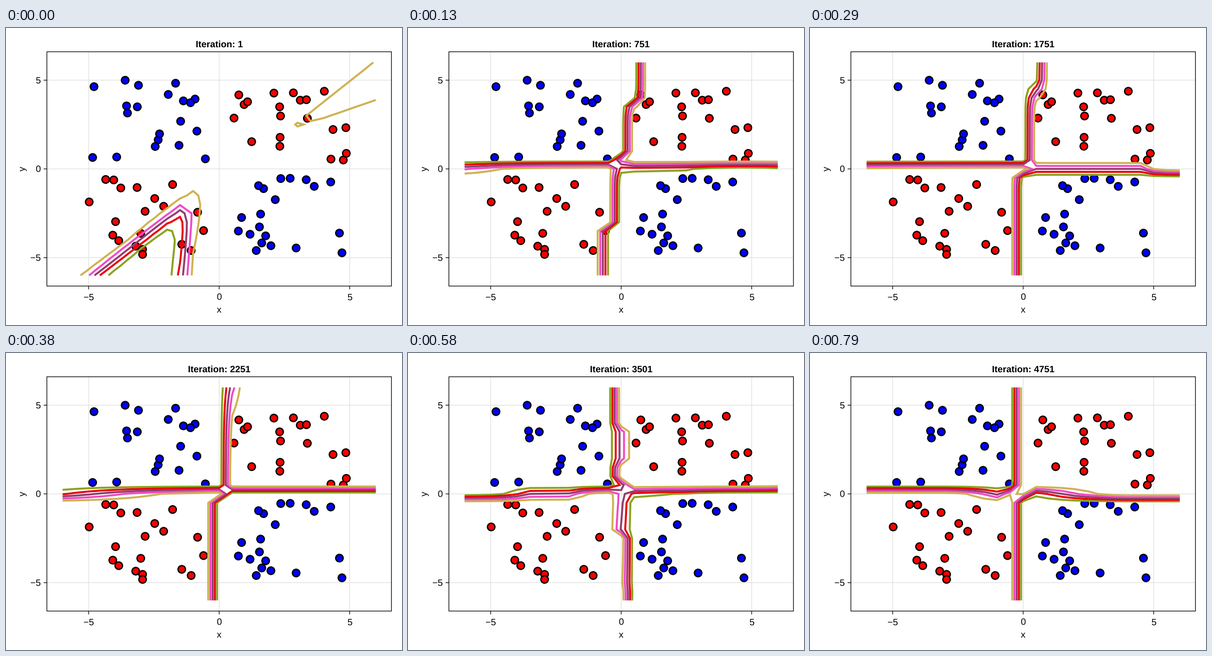
These frames come from a looping animation (864 by 648 pixels, 830 ms). A matplotlib script:

```python
import matplotlib.pyplot as plt
import numpy as np
from matplotlib.animation import FuncAnimation
from matplotlib.collections import PatchCollection
from matplotlib.patches import Circle, Rectangle

W, H = 864, 648
U = 1.44                                   # pixels per layout unit
LEFT, RIGHT, TOP, BOTTOM = 62 * U, 584 * U, 36 * U, 391 * U
CX, CY = (LEFT + RIGHT) / 2, (TOP + BOTTOM) / 2
LIMIT = 6.6                                # the axes show -6.6 to 6.6
SX, SY = (RIGHT - LEFT) / (2 * LIMIT), (BOTTOM - TOP) / (2 * LIMIT)
LOOP_MS, TICK_MS = 830, 10

COLORS = ["#8ca31d", "#ea000e", "#923f72", "#f04bc6", "#cfb252"]
LEVELS = np.arange(1, 6) / 6
GRID = np.linspace(-6, 6, 25)
SHARP = 10                                 # steepness of the trained boundary

plt.rcParams["font.family"] = "Liberation Sans"
plt.rcParams["text.hinting"] = "none"
plt.rcParams["path.snap"] = False

fig = plt.figure(figsize=(W / 72, H / 72), dpi=72, facecolor="white")
ax = fig.add_axes([0, 0, 1, 1])
ax.set_xlim(0, W)
ax.set_ylim(H, 0)
ax.axis("off")


def px(x):
    return CX + SX * x


def py(y):
    return CY - SY * y


def label(x, y, text, **kw):
    style = dict(fontsize=14 * U, ha="center", va="baseline", color="black")
    return ax.text(x, y, text, **{**style, **kw})


def segment(x, y, color="black", zorder=1):
    ax.plot(x, y, color=color, lw=U, zorder=zorder, solid_capstyle="butt")


def draw_axes():
    tick = 5 * U
    for v in (-5, 0, 5):
        x, y = px(v), py(v)
        segment([x, x], [TOP, BOTTOM], "#e0e0e0", 0)
        segment([LEFT, RIGHT], [y, y], "#e0e0e0", 0)
        segment([x, x], [BOTTOM, BOTTOM + tick])
        segment([LEFT - tick, LEFT], [y, y])
        text = str(v).replace("-", "\u2212")
        label(x, 594, text)
        label(75.5, y + 7, text, ha="right")
    ax.add_patch(Rectangle((LEFT, TOP), RIGHT - LEFT, BOTTOM - TOP,
                           fill=False, ec="black", lw=U, zorder=5))
    label(CX, 621, "x")
    label(36.5, CY, "y", rotation=90, va="center")


def dots(color, points):
    circles = [Circle(p, 0.47 * 12 * U) for p in points]
    ax.add_collection(PatchCollection(circles, facecolor=color, zorder=2,
                                      edgecolor="black", linewidth=2 * U))


draw_axes()
title = label(CX, 41.7, "", fontweight="bold")

# The observed samples, one call per quadrant, in pixels.
dots("#0000ff", [
    (192, 128), (260, 114), (289, 125), (370, 120.5), (354, 145),
    (412.5, 155), (387, 159), (402.5, 163), (263, 170), (265, 185.5),
    (286.5, 172), (381, 203.5), (416.5, 225), (332, 244), (335, 231),
    (325.5, 258.5), (377.5, 256), (189, 282.5), (241.5, 281.5), (435, 285.5)])
dots("#0000ff", [
    (599.5, 328.5), (620, 328), (655, 331), (672.5, 345.5), (708.5, 336),
    (562, 350.5), (551, 344), (587.5, 374.5), (514, 413.5), (555.5, 406),
    (507, 443), (553, 434), (532.5, 450), (566.5, 453.5), (558, 469),
    (546, 485.5), (578, 475), (633, 480), (727.5, 447.5), (733, 490.5)])
dots("#ff0000", [
    (508, 146), (519.5, 167), (527, 161), (584.5, 142), (627, 141.5),
    (642, 157.5), (655.5, 156.5), (694.5, 138), (597, 172), (599, 192),
    (657.5, 197), (497.5, 196.5), (536, 248), (598, 238.5), (597.5, 258),
    (713.5, 221.5), (741.5, 217.5), (709, 286), (736, 288), (742.5, 273.5)])
dots("#ff0000", [
    (217.5, 330.5), (235, 331.5), (250.5, 349), (286, 348), (363.5, 341.5),
    (181.5, 379.5), (324.5, 372), (344, 389), (303.5, 400), (418, 402),
    (239, 422.5), (233, 452), (246, 464), (294, 448), (431, 442),
    (283, 476), (298, 483), (298, 494), (383.5, 472), (404, 485.5)])


def untrained():
    """Random network: a deep wedge at lower left, a shallow one at right."""
    x, y = np.meshgrid(GRID, GRID)
    left = ((y + 6) / 1.146 - (x + 4.78)) / 0.29
    right = (x + 1.41 - 0.07 * (y + 6)) / 0.2
    deep = np.logaddexp(left, right)
    above = y - 2.985 - 1.17 * (x - 3.335)
    below = 2.6 + 0.51 * (x - 3.47) - y
    shallow = np.log(5) + 0.5 * np.maximum(above, below)
    return 1 / (1 + np.exp(-np.minimum(deep, shallow)))


# Trained boundaries, x = up(y) and y = across(x), by their bends.
key_steps, key_bounds = [], []


def key(step, up, across):
    key_steps.append(step)
    key_bounds.append([np.interp(GRID, *zip(*bends)) for bends in (up, across)])


key(2, up=[(-3.5, -.75), (-3, -.25), (.5, -.2), (1, .18), (2.6, .18), (4.2, .72)],
    across=[(-5.9, -.08), (-1, .2), (2.7, .23), (5.5, .54)])
key(5, up=[(-1, -.25), (0, .25), (3.2, .25), (5, .75)],
    across=[(0, .25), (.5, -.25), (4.5, -.25), (6, -.75)])
key(9, up=[(-.5, -.25), (0, .25), (6, .48)],
    across=[(-6, -.04), (-1, .12), (0, .25)])
key(12, up=[(-6, -.65), (-4, -.48), (-2.5, -.27), (.5, -.2), (1.5, -.02), (2, .22)],
    across=[(-6, -.2), (-3.5, .2), (2.5, .25), (4, .46), (6, .68)])
key(16, up=[(-5.5, 1.25), (-5, .8), (-2.5, .75), (-2, .25), (.5, .25),
            (1, -.25), (3.5, -.25), (4, -.75)],
    across=[(-2, -.2), (0, .2), (.5, -.13), (6, .035)])
key(19, up=[(0, -.25)],
    across=[(-3, .15), (-1, -.01), (-.5, .075), (0, -.09), (.5, .06),
            (3, -.09), (4, -.25)])


def trained(step):
    """Class probability, with the boundaries moving from key to key."""
    step = max(step, key_steps[0])
    i = min(np.searchsorted(key_steps, step, side="right") - 1,
            len(key_steps) - 2)
    t = (step - key_steps[i]) / (key_steps[i + 1] - key_steps[i])
    up, across = ((1 - t) * a + t * b
                  for a, b in zip(key_bounds[i], key_bounds[i + 1]))
    side = np.tanh(SHARP * (GRID[None, :] - up[:, None]))
    height = np.tanh(SHARP * (GRID[:, None] - across[None, :]))
    return 0.5 + 0.5 * side * height


contours = []


def update(n):
    step = (12 * (2 * n + 1) - 1) // 100     # 24 steps a second on a 10 ms clock
    title.set_text(f"Iteration: {250 * step + 1}")
    while contours:
        contours.pop().remove()
    cs = ax.contour(px(GRID), py(GRID), trained(step) if step else untrained(),
                    levels=LEVELS, colors=COLORS, linewidths=3 * U, zorder=3)
    cs.set_joinstyle("miter")
    contours.append(cs)
    return []


anim = FuncAnimation(fig, update, frames=LOOP_MS // TICK_MS, interval=TICK_MS,
                     repeat=True, repeat_delay=0, blit=False)
plt.show()
```
